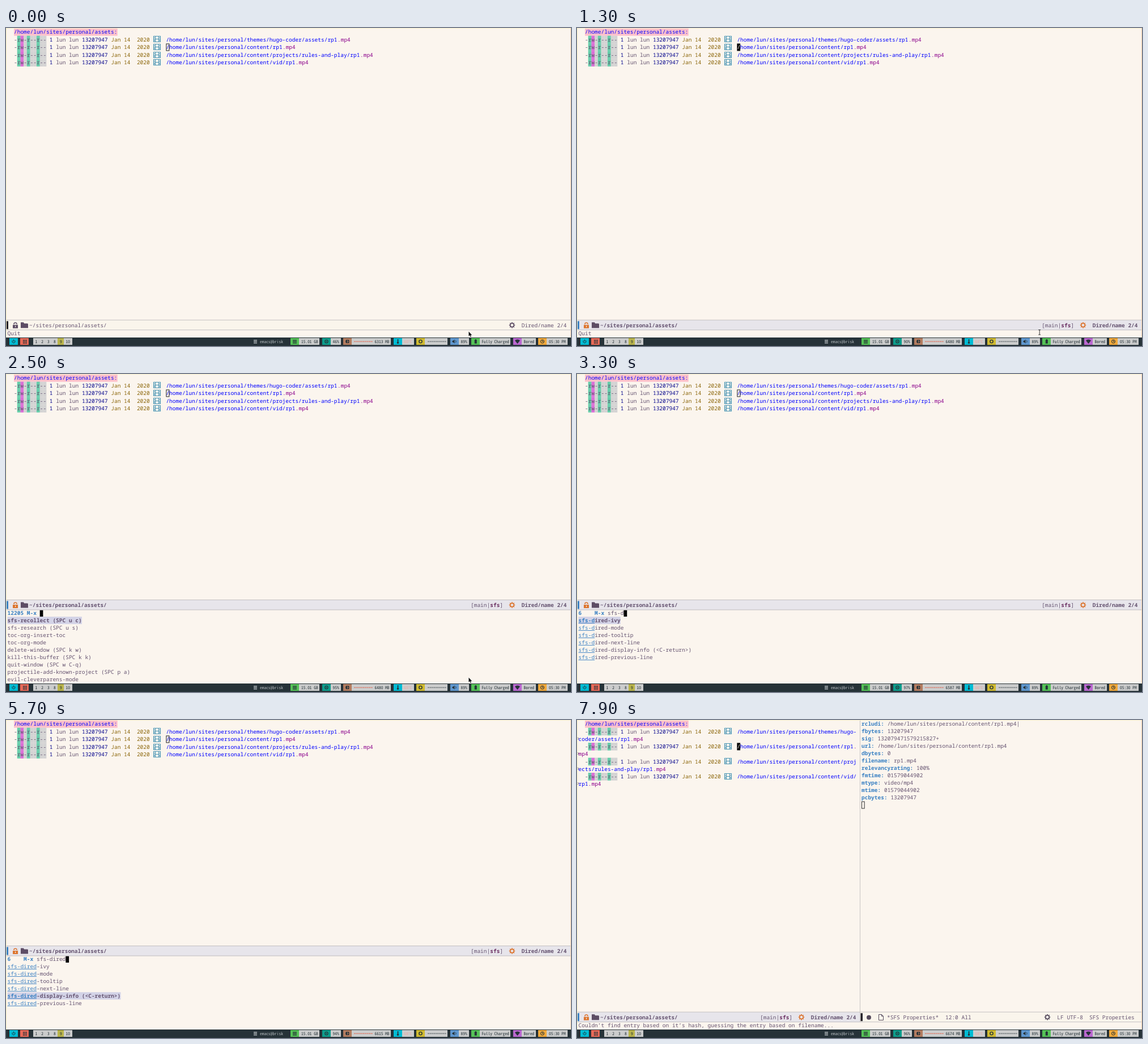
An HTML page with a canvas for the animation above (8000 ms loop, 997 px wide and 561 px high).

```html
<!DOCTYPE html>
<html lang="en">
<head>
<meta charset="utf-8">
<title>Dired search</title>
<style>
  html, body { margin: 0; width: 100%; height: 100%; overflow: hidden; background: #fbf5ee; }
  canvas { display: block; }
</style>
</head>
<body>
<canvas id="stage" width="997" height="561"></canvas>
<script>
const ctx = document.getElementById("stage").getContext("2d");
ctx.textRendering = "geometricPrecision";

const LOOP = 8000, W = 997, X0 = 2.6, CELL = 5.71, ROW = 13;
const PAPER = "#fbf5ee", TEXT = "#655370", BLUE = "#3a81c3", ORANGE = "#dc752f", PURPLE = "#6c3163";
const MONO = '"Noto Sans Mono", "DejaVu Sans Mono", monospace';
const NARROW = '"Noto Sans Mono CJK JP", "Noto Sans Mono", monospace';

// Font size at which one character is as wide as the given advance
function sizeFor(family, advance) {
  ctx.font = `100px ${family}`;
  return advance * 100 / ctx.measureText("0").width;
}
const mainSize = sizeFor(MONO, CELL), barSize = sizeFor(NARROW, 3.72);

function box(x, y, w, h, color) {
  ctx.fillStyle = color;
  ctx.fillRect(x, y, w, h);
}
function frame(x, y, w, h, color) {
  ctx.strokeStyle = color;
  ctx.lineWidth = 1;
  ctx.strokeRect(x, y, w, h);
}
function disc(x, y, r, color) {
  ctx.fillStyle = color;
  ctx.beginPath();
  ctx.arc(x, y, r, 0, 7);
  ctx.fill();
}
function ring(x, y, r, color, width, from = 0, to = 7) {
  ctx.strokeStyle = color;
  ctx.lineWidth = width;
  ctx.beginPath();
  ctx.arc(x, y, r, from, to);
  ctx.stroke();
}
function shape(points, color) {
  ctx.fillStyle = color;
  ctx.beginPath();
  points.forEach(([x, y]) => ctx.lineTo(x, y));
  ctx.fill();
}
// y is the vertical middle of the text row
function text(s, x, y, color = TEXT, bold = false) {
  ctx.font = `${bold ? "bold " : ""}${mainSize}px ${MONO}`;
  ctx.fillStyle = color;
  ctx.fillText(s, x, y + 3.3);
  return x + s.length * CELL;
}
function barText(s, x, color = "#263238") {
  ctx.font = `${barSize}px ${NARROW}`;
  ctx.fillStyle = color;
  ctx.fillText(s, x, 555.6);
}
const at = col => X0 + col * CELL;
// Last entry of [time, ...values] that has begun
const current = (steps, t) => steps.findLast(step => step[0] <= t);

// ---- file listing ----
const HOME = "/home/lun/sites/personal/";
const FILES = ["themes/hugo-coder/assets/rp1", "content/rp1", "content/projects/rules-and-play/rp1", "content/vid/rp1"]
  .map(name => HOME + name + ".mp4");
const MODE_COLORS = { r: "#66cdaa", w: "#da70d6", "-": "#d3d3d3" };

function filmIcon(x, y) {
  const color = "#4593b3";
  frame(x + .5, y - 4.5, 12, 10, color);
  frame(x + 3.5, y - 4.5, 6, 10, color);
  box(x + 3, y, 7, 1, color);
  for (const side of [1, 10]) for (const dy of [-2, 1, 3]) box(x + side, y + dy, 2, 1, color);
}

function fileName(path, start, end, x, y) {
  const dot = path.length - 4;
  const next = text(path.slice(start, Math.min(end, dot)), x, y, "#0000ff");
  text(path.slice(Math.max(start, dot), end), next, y, "#8b008b");
}

function pointCursor(y, filled) {
  const x = at(49);
  if (filled) {
    box(x, y - 6.5, CELL, 13, "#000");
    text("/", x, y, PAPER);
  } else frame(x + .5, y - 6, 5, 12, "#222");
}

function listing(split, activePoint) {
  const heading = HOME + "assets:";
  box(at(2), 1, heading.length * CELL, 12.7, "#ffc0cb");
  text(heading, at(2), 7, "#0000ff");
  let y = 20.4;
  FILES.forEach((path, i) => {
    [..."rw-r--r--"].forEach((c, k) => {
      box(at(3 + k), y - 6.8, CELL + .2, 13.6, MODE_COLORS[c]);
      text(c, at(3 + k), y);
    });
    text("-", at(2), y);
    text("1", at(13), y, "#00008b");
    text("lun lun", at(15), y);
    text("13207947", at(23), y, "#00008b");
    text("Jan 14  2020", at(32), y, "#8b6508");
    filmIcon(260, Math.round(y) - 1);
    const end = split ? 37 : path.length;
    fileName(path, 0, end, at(49), y);
    if (i === 1) pointCursor(y, activePoint);
    if (split) {
      y += 13.25;
      fileName(path, end, path.length, X0, y);
      ring(1, y - 1, 1.6, "#655370", .9, -1.5, 1.8);
      y += 13.25;
    } else y += 13.55;
  });
}

// ---- mode lines ----
function gear(x, y, color) {
  ring(x, y, 3.1, color, 1.5);
  ctx.lineWidth = 1.7;
  for (let k = 0; k < 8; k++) {
    const a = k * Math.PI / 4, c = Math.cos(a), s = Math.sin(a);
    ctx.beginPath();
    ctx.moveTo(x + 3.5 * c, y + 3.5 * s);
    ctx.lineTo(x + 5.2 * c, y + 5.2 * s);
    ctx.stroke();
  }
}
function modeLineBase(x, w, y, active) {
  box(x, y - 9, w, 18, active ? "#e7e5eb" : "#faf5ec");
  box(x, y - 9.5, w, 1, "#c3c0c2");
  box(x, y + 8, w, 1, "#c3c0c2");
  box(x + .5, y - 7, 3.5, 14, active ? BLUE : "#211f26");
}
function diredModeLine(y, right, active) {
  modeLineBase(0, right, y, active);
  const accent = active ? ORANGE : "#5d4d65", dark = "#5d4d65";
  box(12, y - .5, 9, 6, accent);
  ring(16.5, y - 1.5, 2.7, accent, 1.4, Math.PI, 2 * Math.PI);
  box(16, y + 1, 1.2, 2.5, PAPER);
  shape([[26, y - 5], [31, y - 5], [32, y - 3], [38, y - 3], [39, y - 2], [39, y + 5], [26, y + 5]], dark);
  text("~/sites/personal/assets/", 41, y, TEXT, active);
  if (active) {
    const x = text("[main|", right - 177, y);
    text("]", text("sfs", x, y, PURPLE, true), y);
  }
  gear(right - 104, y, accent);
  text("Dired/name 2/4", right - 87.3, y, TEXT, active);
}

// ---- minibuffer ----
const COMMANDS = ["sfs-recollect (SPC u c)", "sfs-research (SPC u s)", "toc-org-insert-toc", "toc-org-mode",
  "delete-window (SPC k w)", "kill-this-buffer (SPC k k)", "quit-window (SPC w C-q)",
  "projectile-add-known-project (SPC p a)", "evil-cleverparens-mode"];
const MATCHES = ["ivy", "mode", "tooltip", "next-line", "display-info (<C-return>)", "previous-line"].map(s => "sfs-dired-" + s);
const INPUT = [[0, ""], [3200, "sfs-d"], [3400, "sfs-di"], [3500, "sfs-dir"], [3600, "sfs-dire"], [3700, "sfs-dired"]];
const SELECTED = [[0, 0], [4100, 1], [5600, 3], [5700, 4]];

function minibuffer(t) {
  const input = current(INPUT, t)[1], selected = current(SELECTED, t)[1];
  box(0, 416, W, 130, PAPER);
  const x = text(input ? "6    M-x " : "12205 M-x ", X0, 421.7, BLUE, true);
  const end = text(input, x, 421.7);
  box(end, 415.3, CELL, 12.7, "#000");
  (input ? MATCHES : COMMANDS).forEach((command, i) => {
    const y = 434.7 + i * ROW, bold = i === selected;
    if (bold) box(X0, y - 6.5, command.length * CELL, ROW, "#d3d3e7");
    const rest = text(input, X0, y, BLUE, bold);
    if (input) box(X0, y + 4.3, rest - X0, .9, BLUE);
    text(command.slice(input.length), rest, y, TEXT, bold);
  });
}

// ---- properties window ----
const PROPERTIES = { rcludi: HOME + "content/rp1.mp4|", fbytes: "13207947", sig: "132079471579215827+",
  url: HOME + "content/rp1.mp4", dbytes: "0", filename: "rp1.mp4", relevancyrating: "100%",
  fmtime: "01579044902", mtype: "video/mp4", mtime: "01579044902", pcbytes: "13207947" };

function propertiesWindow() {
  box(499, 0, 1, 533, "#c9c5c4");
  Object.entries(PROPERTIES).forEach(([key, value], i) => {
    const y = 7 + i * ROW;
    text(" " + value, text(key + ":", 502, y, BLUE, true), y);
  });
  frame(502.5, 144, 4.7, 12, "#333");
  const y = 524.2, dark = "#554a5c";
  modeLineBase(500, W - 500, y, false);
  disc(515, y + .5, 4, dark);
  ctx.strokeStyle = dark;
  ctx.lineWidth = 1;
  ctx.stroke(new Path2D("M532.5 519.5h5l3 3v7h-8zM537.5 519.5v3h3"));
  text("*SFS Properties*", 547, y);
  text("12:0 All", 650, y);
  gear(830, y, dark);
  text("LF UTF-8", 847.3, y);
  text("SFS Properties", 904, y);
}

// ---- status bar ----
// time, processor %, memory MB, temperature
const STATUS = [[0, 46, 6313, 60], [300, 60, 6313, 60], [1300, 90, 6480, 64], [2300, 95, 6480, 65], [3300, 97, 6587, 66],
  [4300, 95, 6587, 67], [5300, 94, 6615, 68], [6300, 95, 6615, 68], [7300, 96, 6674, 68]];
const INK = "#263238", PANEL = "#cbcccc";

function module(x, color, end, label, labelX, labelColor) {
  box(x, 547, 15, 12, color);
  if (!end) return;
  box(x + 15, 547, end - x - 15, 12, PANEL);
  barText(label, labelX, labelColor);
}
function dashes(x, width, color) {
  for (let dx = 0; dx < width; dx += 3.7) box(x + dx, 552.6, 3.2, 1, color);
}
function stack(x, w, color = INK) {
  for (const y of [550.2, 552.6, 555]) box(x, y, w, 1.4, color);
}

function statusBar(t) {
  const [, cpu, memory, heat] = current(STATUS, t);
  box(0, 546, W, 15, INK);

  module(6, "#00bcd4");
  ring(13.5, 553, 2.5, INK, 1, -.9, 4);
  box(13, 549.5, 1, 3.5, INK);
  module(25, "#e86a58");
  for (const x of [30, 32.5, 35]) for (const y of [550, 552.5, 555]) box(x, y, 1.7, 1.7, INK);

  box(48, 547, 69, 12, PANEL);
  box(91, 547, 11, 12, "#b9b44b");
  ["1", "2", "3", "8", "9", "10"].forEach((n, i) => barText(n, [51.5, 62.3, 73, 84, 95, 105.5][i]));

  stack(437, 6, "#aeb5b8");
  barText("emacs@brisk", 448, "#b4bbbe");

  module(502, "#55c257", 553, "15.01 GB", 521);
  stack(506, 7);
  module(558, "#0d9d8c", 591, cpu + "%", 576.5);
  ring(565.5, 553, 2.7, INK, 1.1);
  disc(565.5, 553, 1, INK);
  module(595, "#b37c60", 679, memory + " MB", 650.5);
  disc(602.5, 553, 3.3, INK);
  box(602, 549.5, .8, 7, "#b37c60");
  box(602, 552.6, 4, .8, "#b37c60");
  dashes(614, 33, "#e2654f");
  module(684, "#00bcd4", 720, heat + "°C", 702.5, "#eeaaa5");
  box(690.7, 549, 1.7, 6, INK);
  disc(691.5, 555.3, 1.7, INK);
  module(724, "#cfba30", 779, "", 744);
  ring(731.5, 553, 2.6, INK, 1.4);
  dashes(744, 31, "#555d61");
  module(784, "#5f97cf", 817, "89%", 802.5);
  shape([[787.5, 551.7], [789, 551.7], [791.5, 549.5], [791.5, 556.5], [789, 554.3], [787.5, 554.3]], INK);
  ring(791.5, 553, 2.6, INK, .9, -1, 1);
  module(821, "#55c257", 890, "Fully Charged", 839.3);
  box(826.8, 550, 4, 6.6, INK);
  box(828, 549, 1.6, 1, INK);
  module(895, "#bb68d0", 935, "Bored", 913.5);
  shape([[898, 551.2], [900, 550], [902.5, 549.5], [905, 550], [907, 551.2], [902.5, 557]], INK);
  module(939, "#f0a83b", 991, "05:30 PM", 958);
  ring(946.5, 553, 3, INK, 1);
  ctx.stroke(new Path2D("M946.5 551v2.2h1.8"));
}

// ---- mouse pointer ----
function arrow() {
  const outline = new Path2D("M816.5 535.5v8.3l1.9-1.7 1.3 3 1.3-.6-1.3-2.8h2.6z");
  ctx.lineWidth = 1;
  ctx.strokeStyle = "#fff";
  ctx.stroke(outline);
  ctx.fillStyle = "#111";
  ctx.fill(outline);
}
function ibeam() {
  ctx.lineWidth = .9;
  ctx.strokeStyle = "#222";
  ctx.stroke(new Path2D("M814.2 532.5h4M816.2 532.5v8.5M814.2 541h4"));
}

function draw(t) {
  const focused = t >= 100, prompt = t >= 1700 && t < 7300, split = t >= 7300;
  box(0, 0, W, 561, PAPER);
  listing(split, focused && !prompt);
  if (prompt) minibuffer(t);
  else {
    text(split ? "Couldn’t find entry based on it’s hash, guessing the entry based on filename..." : "Quit", X0, 538.5);
  }
  diredModeLine(prompt ? 407.5 : 524.2, split ? 500 : W, focused);
  if (split) propertiesWindow();
  box(0, 0, W, 1, "#fbf3cf");
  box(0, 0, 1, 546, "#f8efc4");
  box(W - 1, 0, 1, 546, "#f3d3ae");
  statusBar(t);
  if (!focused || (prompt && t < 3200)) arrow();
  else if (t < 1700) ibeam();
}

const start = performance.now();
function tick() {
  draw((performance.now() - start) % LOOP);
  requestAnimationFrame(tick);
}
tick();
</script>
</body>
</html>
```
